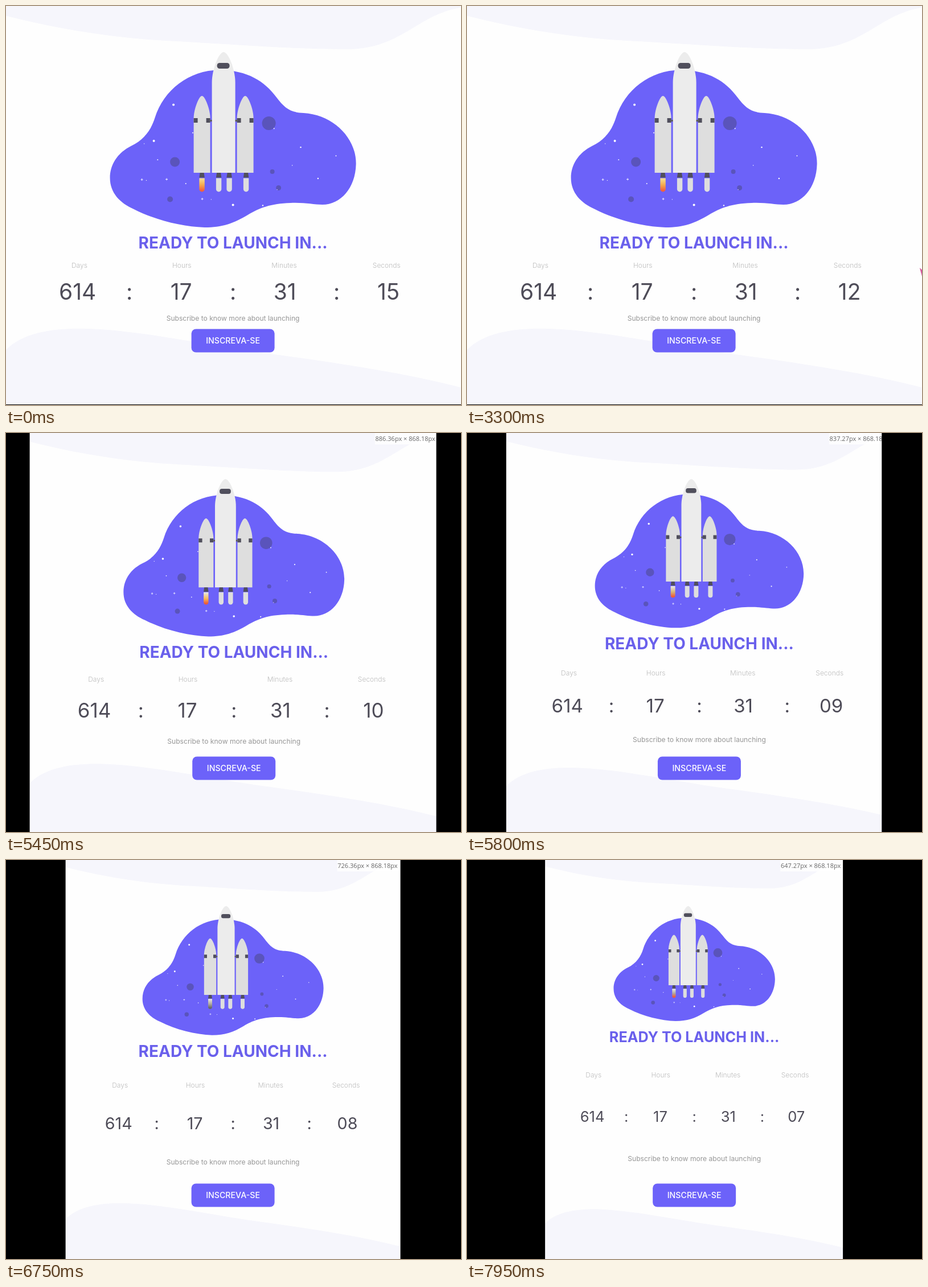
Animation, 799 px wide and 701 px high, one loop 8 s. Source, as an HTML page:

```html
<!DOCTYPE html>
<html lang="en">
<head>
<meta charset="utf-8">
<title>Ready to launch</title>
<style>
html, body { margin: 0; width: 100%; height: 100%; overflow: hidden; background: #000; }
svg { display: block; width: 799px; height: 701px; font-family: Inter, sans-serif; text-anchor: middle; }
.wave { fill: #f6f6fc; }
.dark { fill: #504f5c; }
.booster, .flame { fill: #dedede; }
.crater { fill: #5a54bb; }
.violet { fill: #6c62f9; }
#title { font-weight: 700; font-size: 28px; fill: #6a60ec; }
.label { font-weight: 300; font-size: 12px; fill: #bdbdbd; }
.num { font-size: 39px; fill: #4e4c58; }
#sub { font-size: 12.1px; fill: #979797; }
#size { font: 11px "Open Sans", sans-serif; fill: #666; text-anchor: end; }
</style>
</head>
<body>
<svg viewBox="0 0 799 701">
  <defs>
    <linearGradient id="fire" x2="0" y2="1">
      <stop offset=".05"/><stop offset=".5"/><stop offset=".9"/>
    </linearGradient>
    <g id="side">
      <path class="booster" d="M330 293V197C330 182 339 158 344.500 158S359 182 359 197V293Z"/>
      <path class="dark" d="M330 197h7v8h-7zM352 197h7v8h-7z"/>
    </g>
    <g id="nozzle">
      <path class="dark" d="M-3.500 293h7l1.200 8.500h-9.400z"/>
      <path d="M-4.700 302.500h9.400v19.300a4.700 4.700 0 0 1-9.400 0z"/>
    </g>
    <path id="plus" stroke="#e9e9ff" d="M-2 0h4m-2-2v4"/>
  </defs>
  <rect id="page" width="799" height="700" fill="#fefefe"/>
  <path id="top" class="wave" d="M0 0V17C90 40 190 57 300 62C380 66 500 76 600 76C695 76 725 14 799 3V0Z"/>
  <path id="bottom" class="wave" d="M0 0V-95C50-148 170-134 250-123C350-108 420-94 480-87C600-70 700-55 799-30V0Z"/>
  <g id="art">
    <path class="violet" d="M615 278C614 320 588 349 556 349C540 349 525 345 500 346C465 347 445 355 425 367C400 382 380 389 349 389C310 388 262 376 225 357C200 346 183 328 183 302C183 275 200 256 220 246C245 234 256 215 262 196C277 148 322 112.500 375 112.500C425 112.500 455 133 475 160C490 180 500 187 523 188C575 191 616 232 615 278Z"/>
    <g class="crater">
      <circle cx="462" cy="206" r="12"/><circle cx="297" cy="274" r="8.500"/><circle cx="468" cy="291" r="4"/>
      <circle cx="479" cy="319.500" r="4.500"/><circle cx="288.500" cy="339.500" r="5"/>
    </g>
    <g id="stars" fill="#fff">
      <circle cx="294.500" cy="173.500" r="2"/><circle cx="260" cy="237" r="2"/><circle cx="399" cy="349.500" r="2"/>
    </g>
    <use href="#plus" x="239" y="305"/><use href="#plus" x="282.500" y="304.500"/><use href="#plus" x="345" y="339"/>
    <path class="dark" d="M358 200h5v3h-5zM402 200h5v3h-5z"/>
    <use href="#side"/><use href="#side" x="76"/>
    <path fill="#ececec" d="M362 293V134C362 112 374 81 382.500 81S403 112 403 134V293Z"/>
    <rect class="dark" x="371" y="100" width="22" height="10" rx="4.500"/>
    <use href="#nozzle" x="344.500" fill="url(#fire)"/>
    <g class="flame"><use href="#nozzle" x="374"/><use href="#nozzle" x="392.500"/><use href="#nozzle" x="422"/></g>
  </g>
  <text id="title">READY TO LAUNCH IN...</text>
  <g id="clock"></g>
  <text id="sub">Subscribe to know more about launching</text>
  <g id="button">
    <rect class="violet" x="-73" y="567.500" width="146" height="41" rx="8"/>
    <text y="593" font-size="14.200" font-weight="500" fill="#fff">INSCREVA-SE</text>
  </g>
  <g id="frame">
    <g id="badge">
      <rect width="111" height="20" fill="#fff" fill-opacity=".8"/>
      <text id="size" x="106" y="14"></text>
    </g>
    <rect id="left" height="701"/><rect id="right" height="701" width="799"/>
  </g>
  <path id="cursor" fill="#d6579d" d="M0 0L14 12H8.500L5.500 20Z"/>
</svg>
<script>
const $ = id => document.getElementById(id);
const set = (el, attrs) => { for (const k in attrs) el.setAttribute(k, attrs[k]); };
const add = (parent, tag, attrs, text = '') => {
  const el = document.createElementNS('http://www.w3.org/2000/svg', tag);
  set(el, attrs);
  el.textContent = text;
  return parent.appendChild(el);
};

// Small stars: golden-angle scatter over an ellipse inside the cloud
for (let i = 0; i < 14; i++) {
  const reach = Math.sqrt((i + 6) / 20), angle = i * 2.4;
  add($('stars'), 'circle', {
    cx: 399 + 190 * reach * Math.cos(angle), cy: 280 + 80 * reach * Math.sin(angle), r: .7 + i % 3 * .25
  });
}
const labels = ['Days', 'Hours', 'Minutes', 'Seconds'].map(s => add($('clock'), 'text', { class: 'label' }, s));
const numbers = ['614', ':', '17', ':', '31', ':', '15'].map(s => add($('clock'), 'text', { class: 'num' }, s));

const RESIZE = 4550, LAG = 67, CENTER = 398.6, ZOOM = 1.359;
// Moves: start, end, then the values reached
const drags = [[RESIZE, 4900, 791.8], [4900, 5000, 779], [5150, 5450, 714], [5650, 5900, 649],
  [6050, 6500, 588], [7150, 7650, 533], [7750, 7950, 523]];
const pointer = [[1400, 1600, 122, 3], [1950, 2400, 681, 182], [2550, 2850, 802, 400],
  [3050, 3200, 786, 484], [3200, 3350, 796, 457], [3500, 3600, 830, 456]];

const easeOut = p => 1 - (1 - p) ** 2;
const glide = (from, moves, t) => moves.reduce((now, [start, end, ...to]) => {
  const p = easeOut(Math.min(1, Math.max(0, (t - start) / (end - start))));
  return now.map((v, i) => v + (to[i] - v) * p);
}, from);

function paintFire(t) {
  const dim = Math.min(1, Math.max(0, (t - 5450) / 800));
  const soot = (.5 + .5 * Math.cos((t - 4900) / 1850 * 2 * Math.PI)) ** 3;
  const colors = t < RESIZE ? ['#f6dc90', '#f5a94e', '#f2613c']
    : ['#e6e4de', `hsl(38 ${90 - 80 * dim}% 66%)`, `hsl(12 ${85 * (1 - soot)}% ${58 - 18 * soot}%)`];
  [...$('fire').children].forEach((stop, i) => set(stop, { 'stop-color': colors[i] }));
}

function draw(t) {
  const resized = t >= RESIZE;
  const [frame] = glide([799], drags, t);
  const [width] = glide([799], drags, t - LAG);
  const left = CENTER - frame / 2, mid = left + width / 2;
  const scale = width / 799, shrink = 799 - width;
  const floor = resized ? 701 : 700;

  set($('page'), { height: floor });
  set($('top'), { transform: `translate(${left} 0) scale(${scale})` });
  set($('bottom'), { transform: `translate(${left} ${floor}) scale(${scale})` });
  set($('art'), { transform: `translate(${mid} 81) scale(${scale}) translate(-399 -81)` });

  const size = width < 566 ? .9 : 1;
  set($('title'), { transform: `translate(${mid} ${415.3 - .379 * shrink + 10.2 * size}) scale(${size})` });
  labels.forEach((el, i) => set(el, { x: mid + (i - 1.5) * .225 * width, y: 460.2 - .286 * shrink }));
  const baseline = 502 - .188 * shrink + 14.4 * scale;
  numbers.forEach((el, i) => set(el, {
    transform: `translate(${mid + (i - 3) * .1139 * width} ${baseline}) scale(${scale})`
  }));
  numbers[6].textContent = String(14 - Math.floor((t - 800) / 991)).padStart(2, '0');
  set($('sub'), { x: mid, y: 552.8 - .0888 * shrink + (resized ? .6 : 0) });
  set($('button'), { transform: `translate(${mid} ${resized ? 1 : 0})` });
  paintFire(t);

  set($('frame'), { visibility: resized ? 'visible' : 'hidden' });
  set($('badge'), { transform: `translate(${left + width - 111} 0)` });
  $('size').textContent = `${(Math.round(width * ZOOM) / 1.1).toFixed(2)}px × 868.18px`;
  set($('left'), { width: Math.max(0, left) });
  set($('right'), { x: left + frame });
  set($('cursor'), { transform: `translate(${glide([222, -24], pointer, t)})` });
}

const start = performance.now();
function loop() {
  const t = (performance.now() - start) % 8000;
  draw(Math.floor(t / 50) * 50);
  requestAnimationFrame(loop);
}
loop();
</script>
</body>
</html>
```
